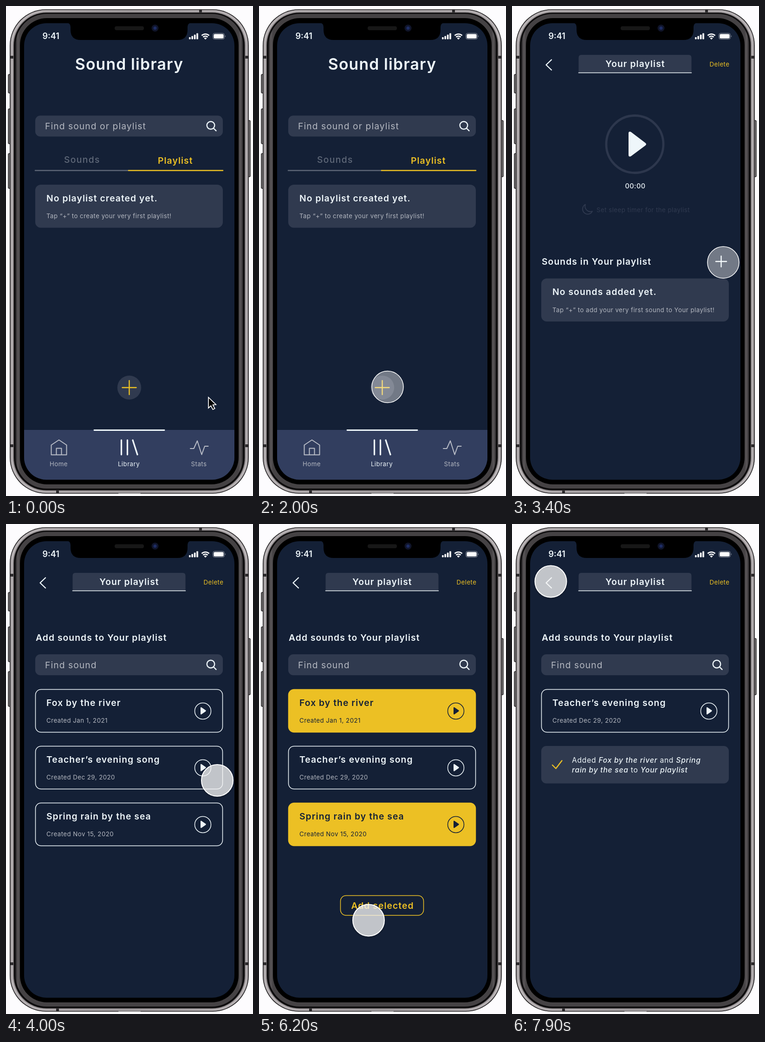
An HTML page that plays this animation: 532 px wide and 1053 px high, repeating every 8 s.

```html
<!DOCTYPE html>
<html lang="en">
<head>
<meta charset="utf-8">
<title>Sound library prototype</title>
<style>
  html, body { margin: 0; width: 100%; height: 100%; overflow: hidden; background: #fdfcfe; }
  svg { display: block; width: 100vw; height: 100vh; }
  text {
    font-family: Inter, sans-serif; font-optical-sizing: none;
    font-size: 19.3px; letter-spacing: .055em; fill: #eef6fa; white-space: pre;
  }
  .b { font-weight: 600; }
  .s { font-size: 13.27px; letter-spacing: .035em; }
  .dim { fill: #b4b8c1; }
  .gold { fill: #ecc024; }
  .mid { text-anchor: middle; }
  .line { fill: none; stroke: #eef6fa; stroke-width: 2.4; stroke-linecap: round; stroke-linejoin: round; }
  .panel { fill: #303a4f; }
  .on text, .on .tri { fill: #142036; }
  .on .box { fill: #ecc024; stroke: #ecc024; }
  .on .ring { stroke: #142036; }
  .box, .ring { fill: none; stroke: #eef6fa; stroke-width: 1.5; }
  .tri { fill: #eef6fa; }
</style>
</head>
<body>
<svg id="stage" viewBox="0 0 532 1053"></svg>
<script>
const sounds = [
  ['Fox by the river', 'Jan 1, 2021'],
  ['Teacher’s evening song', 'Dec 29, 2020'],
  ['Spring rain by the sea', 'Nov 15, 2020']
];

const text = (x, y, str, cls = '', extra = '') => `<text x="${x}" y="${y}" class="${cls}" ${extra}>${str}</text>`;
const rect = (x, y, w, h, r, attrs) => `<rect x="${x}" y="${y}" width="${w}" height="${h}" rx="${r}" ${attrs}/>`;
const line = (d, attrs = '') => `<path class="line" d="${d}" ${attrs}/>`;
const group = (id, body, attrs = '') => `<g id="${id}" ${attrs}>${body}</g>`;

const search = (y, label) =>
  rect(63, y, 404, 45, 11, 'class="panel"') +
  text(84, y + 29.5, label, 'dim') +
  `<circle class="line" cx="441" cy="${y + 21}" r="8.3"/>` +
  line(`M447.3 ${y + 27.5}l5.2 5.2`);

const notice = (y, title, hint) =>
  rect(63, y, 404, 92.5, 12, 'class="panel"') +
  text(87, y + 35.5, title, 'b') + text(87, y + 72, hint, 's dim');

const card = (id, y, [name, date]) => group(id,
  rect(63.5, y + .5, 403, 92, 12, 'class="box"') +
  text(87, y + 35.5, name, 'b') + text(87, y + 72, 'Created ' + date, 's dim') +
  `<circle class="ring" cx="424" cy="${y + 47}" r="17.5"/>` +
  `<path class="tri" d="M419 ${y + 40}q0-2 2-1l9 6.300q1.500 1.200 0 2.400l-9 6.300q-2 1-2-1z"/>`);

const phone = () => {
  const shell = [
    [8, 7, 515, 1041, 78, '#242224'],
    [9.5, 8.500, 512, 1038, 77, 'url(#rim)'],
    [15, 13, 501, 1029, 72, '#777274'],
    [17, 14.500, 497, 1026, 70, '#0c0b0c'],
    [20.500, 17, 490, 1020, 67, 'url(#steel)'],
    [30, 26, 471, 1002, 58, '#000']
  ].map(([x, y, w, h, r, c]) => rect(x, y, w, h, r, `fill="${c}"`)).join('');
  const keys = [[5, 147, 40], [5, 221, 75], [5, 317, 75], [520, 246, 121]]
    .map(([x, y, h]) => rect(x, y, 6, h, 2, 'fill="#787476" stroke="#252325" stroke-width="1.5"')).join('');
  const bands = [[416, 7, 6, 7], [108, 1041, 6, 7], [9, 107, 7, 6], [9, 942, 7, 6], [515, 107, 7, 6], [515, 942, 7, 6]]
    .map(([x, y, w, h]) => rect(x, y, w, h, 0, 'fill="#2b292b"')).join('');
  return keys + shell + bands + rect(242, 1045.500, 48, 2.5, 1, 'fill="#8a8789"') +
    rect(39, 37, 453, 981, 48, 'fill="#142036"');
};

const statusBar = () =>
  `<path d="M131 36q8 1 8 9v6q0 22 22 22h208q22 0 22-22v-6q0-8 8-9z" fill="#000"/>` +
  rect(234, 43.5, 63, 8.500, 4, 'fill="#171717"') +
  `<circle cx="321" cy="47.500" r="7.500" fill="#10152b"/><circle cx="321" cy="47.500" r="3.500" fill="#1d2c63"/>` +
  text(78.500, 71, '9:41', 'b', 'style="font-size:18px;letter-spacing:0"') +
  [4.500, 7, 10, 13].map((h, i) => rect(394 + i * 5.400, 71.500 - h, 3.700, h, 1, 'fill="#fff"')).join('') +
  `<g fill="none" stroke="#fff" stroke-width="2.600"><path d="M421.500 63.500a11.500 11.500 0 0 1 16 0M424.500 66.800a7 7 0 0 1 10 0"/></g>` +
  `<path d="M426.500 69.300a4.300 4.300 0 0 1 6 0l-3 3z" fill="#fff"/>` +
  rect(445.500, 58.500, 25, 13, 4, 'fill="none" stroke="#8b92a0"') +
  rect(447.300, 60.300, 21.400, 9.400, 2.500, 'fill="#fff"') +
  `<path d="M472 63q2 2 0 4z" fill="#8b92a0"/>`;

const library = () =>
  text(265.500, 137, 'Sound library', 'b mid', 'style="font-size:33.7px;letter-spacing:.035em"') +
  search(235.500, 'Find sound or playlist') +
  text(125, 337, 'Sounds', '', 'style="fill:#5f6878;font-weight:500;letter-spacing:.07em"') +
  text(327, 338.500, 'Playlist', 'b gold') +
  line('M63 353.500H264', 'style="stroke:#5c6576"') +
  line('M264 353.500H467', 'style="stroke:#ecc024"') +
  notice(384, 'No playlist created yet.', 'Tap “+” to create your very first playlist!') +
  '<circle class="panel" cx="265.500" cy="820" r="25.700"/>' +
  line('M250.500 820h30M265.500 805v30', 'style="stroke:#ecc024"') +
  '<path d="M39 911H492V970a48 48 0 0 1-48 48H87a48 48 0 0 1-48-48z" fill="#323e5f"/>' +
  line('M190 911.500H341', 'style="stroke-width:2.800"') +
  `<g style="--c:#b9bdc7">` +
  line('M97.500 943.500L114 932.500l16.500 11V964.500h-33zM108.500 964v-13.500h11V964', 'style="stroke:#b9bdc7;stroke-width:2"') +
  line('M397 951h7.500l7.500-16.500 9.500 29.500 6.500-18h7.500', 'style="stroke:#b9bdc7;stroke-width:2"') + '</g>' +
  line('M248.500 933v31M261.500 933v31M273 933l10 31', 'style="stroke-width:3.300"') +
  text(113.500, 988.500, 'Home', 's mid dim') + text(264.500, 988.500, 'Library', 's mid') +
  text(415.500, 988.500, 'Stats', 's mid dim');

const header = () =>
  line('M85 115.500L73.500 126.500L85 137.500') +
  '<path class="panel" d="M143.500 144v-33q0-6 6-6h231q6 0 6 6v33z"/>' +
  line('M143.500 143.500H386.500', 'style="stroke-width:1.600"') +
  text(265.500, 131, 'Your playlist', 'b mid') + text(425.500, 130, 'Delete', 's gold');

const playlist = () =>
  '<circle cx="264.500" cy="297" r="61.500" fill="none" stroke="#2d374d" stroke-width="4.800"/>' +
  '<path class="tri" d="M251 273.500q0-5 5-3l31 23.500q4 3 0 6l-31 23q-5 2-5-3z"/>' +
  text(265.500, 392, '00:00', 'mid', 'style="font-size:14.500px;font-weight:500;letter-spacing:.03em"') +
  line('M158 426.500a11 11 0 1 0 15 14.500a11.500 11.500 0 0 1-15-14.500z', 'style="stroke:#303a50;stroke-width:1.800"') +
  text(182, 443, 'Set sleep timer for the playlist', 's', 'style="fill:#303a50"') +
  text(64, 556, 'Sounds in Your playlist', 'b') +
  line('M439 549h23M450.500 537.500v23') +
  notice(585.500, 'No sounds added yet.', 'Tap “+” to add your very first sound to Your playlist!');

const picker = () =>
  text(64, 250.500, 'Add sounds to Your playlist', 'b') + search(280, 'Find sound');

const it = s => `<tspan font-style="italic" font-weight="500">${s}</tspan>`;
const small = 'style="font-size:15.700px;letter-spacing:.045em"';
const added = () =>
  card('left', 355, sounds[1]) +
  rect(63, 477, 404, 80.500, 11, 'class="panel"') +
  line('M87 518l7.500 7.500L107.500 508.500', 'style="stroke:#ecc024"') +
  text(129, 513, `Added ${it('Fox by the river')} and ${it('Spring')}`, '', small) +
  text(129, 533.500, `${it('rain by the sea')} to ${it('Your playlist')}`, '', small);

const stage = document.getElementById('stage');
stage.innerHTML =
  `<defs>
    <linearGradient id="rim"><stop offset="0" stop-color="#8f8a8c"/><stop offset=".007" stop-color="#b8b3b5"/>
      <stop offset=".5" stop-color="#a19c9e"/><stop offset=".993" stop-color="#b8b3b5"/><stop offset="1" stop-color="#8f8a8c"/></linearGradient>
    <linearGradient id="steel"><stop offset="0" stop-color="#2a282a"/><stop offset=".01" stop-color="#5a5658"/><stop offset=".02" stop-color="#454244"/>
      <stop offset=".98" stop-color="#454244"/><stop offset=".99" stop-color="#5a5658"/><stop offset="1" stop-color="#2a282a"/></linearGradient>
    <filter id="shade" x="-30%" y="-30%" width="160%" height="160%"><feDropShadow dx="0" dy="2" stdDeviation="2" flood-opacity=".35"/></filter>
  </defs>` +
  phone() +
  group('library', library()) + group('header', header()) + group('playlist', playlist()) +
  group('picker', picker()) +
  group('list', sounds.map((s, i) => card('card' + i, 355 + i * 122, s)).join('')) +
  group('add', rect(175.500, 798.500, 179, 42.500, 12, 'class="box" style="stroke:#ecc024"') +
    text(266, 826.500, 'Add selected', 'b mid gold')) +
  group('added', added()) +
  statusBar() +
  group('touch', '<circle id="dot" r="34" stroke="#fff"/>') +
  group('arrow', '<path d="M436 841v23l5.300-4.800 4.200 8 4.200-2.200-4.200-7.800 6.800-.6z" fill="#000" stroke="#fff" stroke-width="1.700"/>');

const el = id => document.getElementById(id);
const show = (id, on) => { el(id).style.display = on ? '' : 'none'; };

// Pointer stops: time, x, y
const stops = [
  [500, 437, 841], [1300, 277, 818.500], [2350, 277, 818.500], [3100, 455, 551], [4400, 455, 551],
  [5050, 378, 391], [5420, 378, 391], [5720, 366, 640], [5950, 366, 640], [6200, 236, 851.500],
  [6400, 240, 832], [7150, 240, 832], [7800, 83.500, 123.500]
];
const presses = [[1600, 2100], [3300, 3600], [5150, 5400], [5740, 5900], [6500, 6800]];

function pointer(t) {
  const i = stops.findIndex(s => s[0] > t);
  if (i === 0) return stops[0].slice(1);
  if (i < 0) return stops[stops.length - 1].slice(1);
  const [t0, x0, y0] = stops[i - 1], [t1, x1, y1] = stops[i];
  const p = (t - t0) / (t1 - t0), e = p * p * (3 - 2 * p);
  return [x0 + (x1 - x0) * e, y0 + (y1 - y0) * e];
}

function draw(now) {
  const t = now % 8000;
  const opened = t >= 2100, picking = t >= 3600, done = t >= 6800;
  show('library', !opened);
  show('header', opened);
  show('playlist', opened && !picking);
  show('picker', picking);
  show('list', picking && !done);
  show('add', t >= 5400 && !done);
  show('added', done);
  el('card0').classList.toggle('on', t >= 5400);
  el('card2').classList.toggle('on', t >= 5900);

  show('arrow', t < 500);
  show('touch', t >= 500);
  const pressed = presses.some(([a, b]) => t >= a && t < b);
  const [x, y] = pointer(t), dot = el('dot');
  el('touch').setAttribute('transform', `translate(${x} ${y})`);
  dot.setAttribute('fill', `rgba(255,255,255,${pressed ? .4 : .7})`);
  dot.setAttribute('stroke-width', pressed ? 1.500 : 2);
  dot.setAttribute('filter', pressed ? 'none' : 'url(#shade)');
  requestAnimationFrame(draw);
}
requestAnimationFrame(draw);
</script>
</body>
</html>
```
